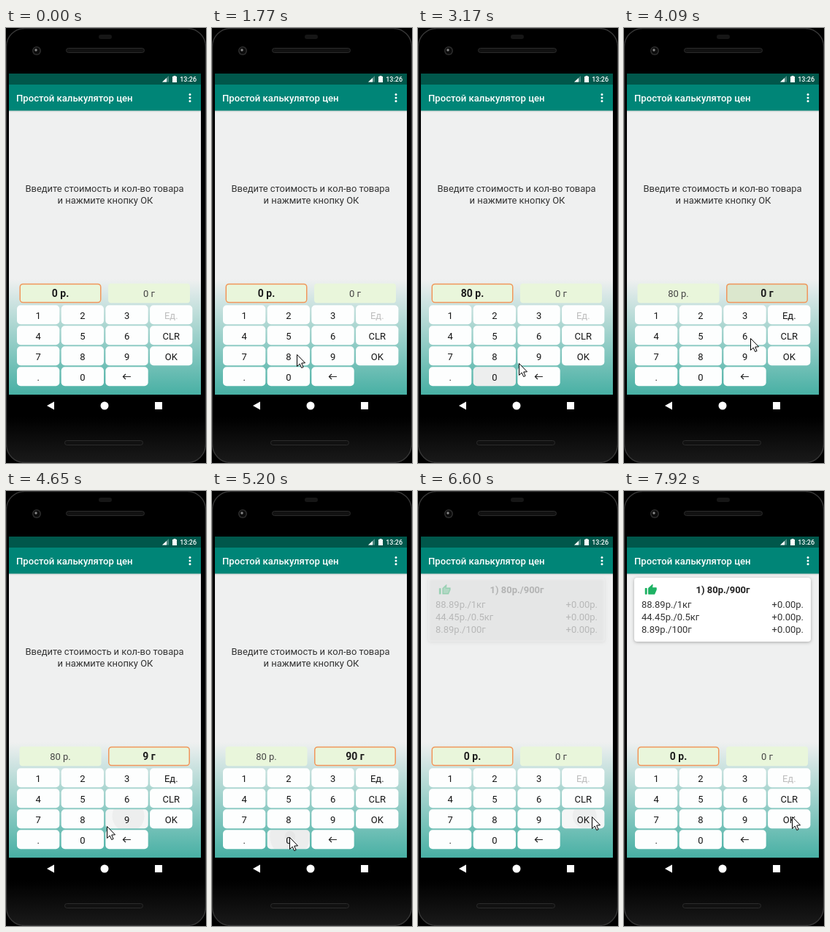
Recreate the animation shown at these times as an HTML page with a canvas. Size 274 by 592 pixels, loop 7990 ms.

```html
<!DOCTYPE html>
<html lang="ru">
<head>
<meta charset="utf-8">
<style>
  html, body { margin: 0; height: 100%; overflow: hidden; background: #000; }
  canvas { display: block; width: 274px; height: 592px; }
</style>
</head>
<body>
<canvas id="stage" width="274" height="592"></canvas>
<script>
const ctx = document.getElementById('stage').getContext('2d');
const LOOP = 7990;
const ENTER = 1070;
const INPUT_DELAY = 90;

const KEYS = ['1', '2', '3', 'Ед.', '4', '5', '6', 'CLR', '7', '8', '9', 'OK', '.', '0', '←'];
const TAPS = [
  [1940, '8'], [2780, '0'], [3690, 'amount'], [4420, '9'],
  [4890, '0'], [5180, '0'], [6450, 'OK']
];

// Pointer glides: start, duration, destination.
const GLIDES = [
  [ENTER, 700, 116, 444], [1770, 80, 105, 433], [2400, 240, 105, 471],
  [3090, 340, 196, 356], [3960, 240, 165, 443], [4575, 250, 106, 471],
  [5560, 345, 255, 444], [6100, 120, 238, 443], [7870, 50, 230, 443]
];

const ramp = (t, start, duration) => Math.min(1, Math.max(0, (t - start) / duration));
const mix = (a, b, k) => a + (b - a) * k;
const easeOut = k => Math.sin(k * Math.PI / 2);

function boxOf(name) {
  if (name === 'price') return [18.5, 347.7, 112, 26.6, 4];
  if (name === 'amount') return [140, 347.7, 112, 26.6, 4];
  const i = KEYS.indexOf(name);
  return [15 + 60.7 * (i % 4), 377.2 + 28 * Math.floor(i / 4), 58.3, 26, 5];
}

// Replays the taps made so far.
function stateAt(t) {
  const state = { price: '0', amount: '0', focus: 'price', doneAt: Infinity };
  for (const [at, name] of TAPS) {
    const effect = at + INPUT_DELAY;
    if (t < effect) break;
    if (name === 'amount') state.focus = name;
    else if (name === 'OK') Object.assign(state, { price: '0', amount: '0', focus: 'price', doneAt: effect });
    else state[state.focus] = String(Number(state[state.focus] + name));
  }
  return state;
}

function rect(x, y, w, h, color) {
  ctx.fillStyle = color;
  ctx.fillRect(x, y, w, h);
}

function rounded(box, fill, stroke, line = 1) {
  ctx.beginPath();
  ctx.roundRect(...box);
  if (fill) { ctx.fillStyle = fill; ctx.fill(); }
  if (stroke) { ctx.strokeStyle = stroke; ctx.lineWidth = line; ctx.stroke(); }
}

function shape(points, fill, stroke) {
  ctx.beginPath();
  points.forEach(([x, y]) => ctx.lineTo(x, y));
  ctx.closePath();
  ctx.fillStyle = fill;
  ctx.fill();
  if (stroke) { ctx.strokeStyle = stroke; ctx.lineWidth = 1; ctx.stroke(); }
}

function dot(x, y, r, color) {
  ctx.beginPath();
  ctx.arc(x, y, r, 0, 2 * Math.PI);
  ctx.fillStyle = color;
  ctx.fill();
}

function fade(y, h, from, to) {
  const gradient = ctx.createLinearGradient(0, y, 0, y + h);
  gradient.addColorStop(0, from);
  gradient.addColorStop(1, to);
  return gradient;
}

function text(str, x, y, { size = 13, weight = 400, color = '#333', align = 'left' } = {}) {
  ctx.font = `${weight} ${size}px Roboto, sans-serif`;
  ctx.fillStyle = color;
  ctx.textAlign = align;
  ctx.fillText(str, x, y);
}

function drawPhone() {
  rect(0, 0, 274, 592, '#000');
  rounded([0.5, 0.5, 273, 591, 25], fade(530, 62, '#000', '#1a1a1a'), '#383838', 1.3);
  rounded([127, 9, 18, 6, 3], '#161616');
  dot(42, 31, 6, '#2e2e2e');
  dot(42, 31, 4.5, '#0c0c0c');
  dot(41, 30, 1.7, '#888');
  for (const [x, y] of [[82, 27], [80, 561]]) {
    rounded([x + 0.5, y + 0.5, 107, 6, 3], '#111', '#2b2b2b');
  }
  shape([[56, 514], [66, 508.5], [66, 519.5]], '#fff');
  dot(135, 514, 5.5, '#fff');
  rect(204, 509, 10, 10, '#fff');
}

function drawScreen() {
  rect(4, 62, 263, 15, '#00574b');
  shape([[214, 73.5], [223, 65], [223, 73.5]], '#4d8981');
  shape([[214, 73.5], [220, 68], [220, 73.5]], '#fff');
  rect(228, 66, 6, 8, '#fff');
  rect(229.5, 65, 3, 1, '#fff');
  text('13:26', 261, 73, { size: 9, weight: 500, color: '#fff', align: 'right' });

  rect(4, 112, 263, 387, '#eff0f0');
  rect(4, 342, 263, 157, fade(342, 157, '#eff0f0', '#48b0a4'));
  rect(4, 112, 263, 3, fade(112, 3, 'rgba(0,0,0,.15)', 'rgba(0,0,0,0)'));
  rect(4, 77, 263, 35.5, '#008577');
  text('Простой калькулятор цен', 14, 100, { size: 13.1, weight: 500, color: '#fff' });
  for (let i = -1; i <= 1; i++) dot(252, 95 + 4.5 * i, 1.5, '#fff');
}

function drawMessage() {
  const style = { size: 12.95, align: 'center' };
  text('Введите стоимость и кол-во товара', 135, 223, style);
  text('и нажмите кнопку ОК', 136, 239, style);
}

function drawThumb(x, y) {
  ctx.save();
  ctx.translate(x, y);
  ctx.scale(0.73, 0.73);
  const hand = new Path2D('M2 20h2V10H2zM22 9h-8l1-6-7 6.5V20h10.5L22 12z');
  ctx.fillStyle = ctx.strokeStyle = '#1fb264';
  ctx.lineWidth = 2;
  ctx.lineJoin = 'round';
  ctx.fill(hand);
  ctx.stroke(hand);
  ctx.restore();
}

function drawCard(alpha) {
  ctx.save();
  ctx.globalAlpha = alpha;
  ctx.shadowColor = 'rgba(0,0,0,.3)';
  ctx.shadowBlur = 4;
  ctx.shadowOffsetY = 1;
  rounded([14, 118, 242, 87, 4], '#fff');
  ctx.shadowColor = 'transparent';
  drawThumb(28, 125.5);
  text('1) 80р./900г', 135.5, 139, { weight: 700, color: '#222', align: 'center' });
  ['88.89р./1кг', '44.45р./0.5кг', '8.89р./100г'].forEach((row, i) => {
    text(row, 24, 159 + 17 * i);
    text('+0.00р.', 246, 159 + 17 * i, { align: 'right' });
  });
  ctx.restore();
}

// Touch feedback clipped to a control's box.
function drawRipple(name, t) {
  const box = boxOf(name);
  const [x, y, w, h] = box;
  for (const [at, tapped] of TAPS) {
    if (tapped !== name || t < at) continue;
    const alpha = 0.033 * (1 - ramp(t, at + 400, 250));
    ctx.save();
    ctx.beginPath();
    ctx.roundRect(...box);
    ctx.clip();
    rect(x, y, w, h, `rgba(0,0,0,${alpha * ramp(t, at, 120)})`);
    dot(x + w / 2 + 2, y + h / 2 - 4, mix(6, w * 0.58, ramp(t, at, 400)), `rgba(0,0,0,${alpha})`);
    ctx.restore();
  }
}

function drawField(name, unit, state, t) {
  const focused = state.focus === name;
  const box = boxOf(name);
  const [x, y, w, h, r] = box;
  rounded(box, '#e9f6db');
  drawRipple(name, t);
  if (focused) rounded([x + 0.75, y + 0.75, w - 1.5, h - 1.5, r], null, '#f0955c', 1.5);
  text(`${state[name]} ${unit}`, x + w / 2, 366, focused
    ? { size: 14, weight: 700, color: '#1c1c1c', align: 'center' }
    : { color: '#444', align: 'center' });
}

function drawArrow(x, y) {
  ctx.stroke(new Path2D(`M${x + 5.5} ${y}h-10.5m3.5 -3.5l-3.5 3.5l3.5 3.5`));
}

function drawKeys(t, unitsOn) {
  ctx.strokeStyle = '#222';
  ctx.lineWidth = 1.2;
  for (const name of KEYS) {
    const box = boxOf(name);
    const [x, y] = box;
    rounded(box, '#fdfefe');
    drawRipple(name, t);
    const color = name === 'Ед.' && !unitsOn ? '#bdbdbd' : '#151515';
    if (name === '←') drawArrow(x + 29, y + 13.3);
    else text(name, x + 29.2, y + 18.3, { color, align: 'center' });
  }
}

// Rising glides leave sideways first, then curve upwards.
function pointerAt(t) {
  let x = 128, y = 576;
  for (const [start, duration, toX, toY] of GLIDES) {
    const k = easeOut(ramp(t, start, duration));
    x = mix(x, toX, k);
    y = mix(y, toY, toY < y ? k * k : k);
  }
  return [Math.round(x) + 0.5, Math.round(y) + 0.5];
}

function drawPointer(t) {
  if (t < ENTER) return;
  ctx.save();
  ctx.translate(...pointerAt(t));
  shape([[0, 0], [0, 16], [3.7, 12.6], [6.2, 18], [8.6, 17], [6.2, 11.6], [11, 11.3]], '#fff', '#000');
  ctx.restore();
}

function draw(t) {
  const state = stateAt(t);
  drawPhone();
  drawScreen();
  if (t < state.doneAt) drawMessage();
  else drawCard(ramp(t, state.doneAt, 240));
  drawField('price', 'р.', state, t);
  drawField('amount', 'г', state, t);
  drawKeys(t, state.focus === 'amount');
  drawPointer(t);
}

const begin = performance.now();
function frame() {
  draw((performance.now() - begin) % LOOP);
  requestAnimationFrame(frame);
}
frame();
</script>
</body>
</html>
```
